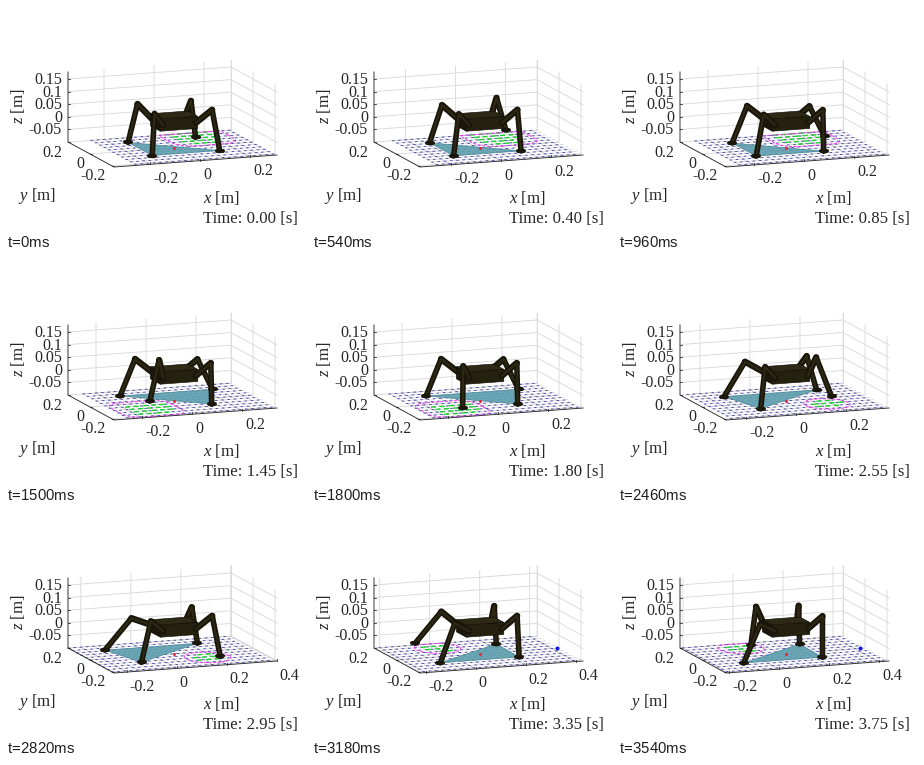
Recreate the animation shown at these times as a matplotlib script. Size 300 by 225 pixels, loop 3.6 s.

```python
import numpy as np
import matplotlib as mpl
import matplotlib.pyplot as plt
from matplotlib.animation import FuncAnimation
from matplotlib.collections import LineCollection
from matplotlib.patches import Polygon

W, H, DPI = 300, 225, 100
FRAMES, STEP = 60, 60
PX = 72 / DPI

mpl.rcParams.update({
    "font.family": "Liberation Serif",
    "mathtext.fontset": "custom",
    "mathtext.rm": "Liberation Serif",
    "mathtext.it": "Liberation Serif:italic",
})

# Axes box on screen: front corner, floor edges, wall height
FRONT = np.array([108.0, 161.0])
EX = np.array([163.0, -12.0])
EY = np.array([-46.0, -25.0])
WALL = 70
X_SCALE, Z_SCALE, Y_SPAN = 250, 252, 0.42   # px/m, px/m, m
Y_ZERO = 0.52                               # place of y = 0 along its edge
TERRAIN_START = -0.25

INK = "#262626"
GRID = "#dadada"
DARK = "#1a170a"
OLIVE = "#2d2914"
TEAL = "#5f9fae"
BLUE = "#4646a4"
MAGENTA = "#ee3cee"
GREEN = "#1fd42f"

# Robot in metres
HEIGHT, THIGH, SHIN, LIFT = 0.106, 0.081, 0.163, 0.03
HALF = np.array([0.075, 0.045, 0.024])
LEGS = [(sx, sy) for sy in (1, -1) for sx in (-1, 1)]   # far pair, then near pair
# One swing per second: leg, step length, centre x, radius and roundness of its area
SWINGS = [(1, 0.10, 0.14, 0.125, 4), (2, 0.05, -0.125, 0.12, 4),
          (3, 0.095, 0.18, 0.085, 2), (0, 0.18, 0.0, 0.085, 2)]


def ramp(t, start, end):
    return min(max((t - start) / (end - start), 0.0), 1.0)


def ease(u):
    return u * u * (3 - 2 * u)


def clock(k):
    """Time shown: steps of 0.05 s, later with every third one doubled."""
    return 0.05 * (max(k - 1, 0) + max(0, (k - 8) // 3))


def travel(t):
    return 0.032 * ramp(t, 0, 0.7) + 0.1 * ramp(t, 2.1, 3.5)


def edge(a, b, up=0):
    """Screen point at fractions a, b of the floor edges."""
    a, b = np.asarray(a)[..., None], np.asarray(b)[..., None]
    return FRONT + a * EX + b * EY - np.array([0, up])


class View:
    """Maps metres to the screen while the box follows the robot."""

    def __init__(self, shift):
        self.x0 = 194 - X_SCALE * shift

    def a(self, x):
        return (self.x0 + x * X_SCALE - FRONT[0]) / EX[0]

    def b(self, y):
        return Y_ZERO + y / Y_SPAN

    def at(self, x, y, z=0):
        return edge(self.a(x), self.b(y), z * Z_SCALE)

    def mesh(self, dx, dy):
        x, y = np.meshgrid(np.arange(TERRAIN_START, 0.6, dx), np.arange(-0.2, 0.21, dy))
        x, y = x.ravel(), y.ravel()
        a, b = self.a(x), self.b(y)
        ok = (a > 0) & (a < 0.99) & (b > 0) & (b < 1)
        return x[ok], y[ok]


fig = plt.figure(figsize=(W / DPI, H / DPI), dpi=DPI, facecolor="white")
ax = fig.add_axes([0, 0, 1, 1])


def line(points, color, width, z=1, **kw):
    p = np.asarray(points)
    ax.plot(p[:, 0], p[:, 1], color=color, lw=width * PX, zorder=z, **kw)


def fill(points, color, z, **kw):
    ax.add_patch(Polygon(points, closed=True, fc=color, zorder=z, **kw))


def dot(p, size, color):
    ax.plot(p[0], p[1], marker="o", ms=size * PX, color=color, mew=0, zorder=3)


def label(x, y, s, size=16, **kw):
    ax.text(x, y, s, fontsize=size * PX, color=INK, zorder=20, **kw)


def dashes(points, color, length, width, z):
    half = EX / np.hypot(*EX) * length / 2
    segs = np.stack([points - half, points + half], axis=1)
    ax.add_collection(LineCollection(segs, colors=color, linewidths=width * PX, zorder=z))


def draw_axes(v):
    for x in (-0.2, 0, 0.2, 0.4):
        a = v.a(x)
        if 0 <= a <= 1:
            line([edge(a, 0), edge(a, 1), edge(a, 1, WALL)], GRID, 0.9)
            p = edge(a, 0)
            line([p, p - [0, 2]], INK, 0.8, 4)
            label(p[0] + 3, p[1] + 18.5, f"{x:g}")
    for y in (-0.2, 0, 0.2):
        b = v.b(y)
        line([edge(0, b), edge(1, b), edge(1, b, WALL)], GRID, 0.9)
        p = edge(0, b)
        line([p, p + [2, 0]], INK, 0.8, 4)
        label(p[0] - 6, p[1] + 14.5, f"{y:g}", ha="right")
    for z in np.arange(-0.05, 0.16, 0.05):
        up = (z + 0.1) * Z_SCALE
        line([edge(0, 1, up), edge(1, 1, up), edge(1, 0, up)], GRID, 0.9)
        p = edge(0, 1, up)
        line([p, p + [2, 0]], INK, 0.8, 4)
        label(56, p[1] + 5, f"{round(z, 2) + 0:g}", ha="right")
    line([edge(1, 1), edge(1, 1, WALL)], GRID, 0.9)
    line([edge(0, 1, WALL), edge(0, 1), edge(0, 0), edge(1, 0)], INK, 0.9, 4)


def draw_terrain(v):
    left = max(0, v.a(TERRAIN_START))
    for y in np.arange(-0.2, 0.21, 0.04):
        line([edge(left, v.b(y)), edge(1, v.b(y))], "#bcbcca", 0.5, 2.1)
    for x in np.arange(TERRAIN_START, 0.6, 0.05):
        a = v.a(x)
        if 0 < a < 1:
            line([edge(a, 0), edge(a, 1)], "#c8c8d2", 0.5, 2.1)
    dashes(v.at(*v.mesh(0.025, 0.04)), BLUE, 2.5, 0.9, 2.2)


def draw_area(v, cx, cy, r, n):
    """Green footholds inside a dashed outline."""
    x, y = v.mesh(0.035, 0.04)
    core = (abs(x - cx) ** n + abs(y - cy) ** n) ** (1 / n) < 0.75 * r
    dashes(v.at(x[core], y[core]), GREEN, 5, 1.4, 2.7)

    q = np.linspace(0, 2 * np.pi, 49)
    c, s = np.cos(q), np.sin(q)
    x = cx + r * np.sign(c) * abs(c) ** (2 / n)
    y = cy + r * np.sign(s) * abs(s) ** (2 / n)
    rim = edge(np.clip(v.a(x), 0, 1), np.clip(v.b(y), 0, 1))
    line(rim, MAGENTA, 1, 2.8, ls=(0, (3, 1.5)))


def home(leg):
    sx, sy = LEGS[leg]
    return np.array([0.135 * sx, 0.02 + 0.11 * sy, 0])


def foot(leg, t):
    order = [s[0] for s in SWINGS].index(leg)
    u = ramp(t, order + 0.12, order + 0.82)
    return home(leg) + [SWINGS[order][1] * ease(u), 0, LIFT * np.sin(np.pi * u)]


def bend(hip, end):
    """Knee of a two-part leg that bends upwards."""
    d = end - hip
    flat, reach = np.hypot(d[0], d[1]), np.linalg.norm(d)
    c = (THIGH ** 2 + reach ** 2 - SHIN ** 2) / (2 * THIGH * reach)
    up = np.arccos(np.clip(c, -1, 1)) + np.arctan2(d[2], flat)
    side = d[:2] / flat * THIGH * np.cos(up)
    return hip + [side[0], side[1], THIGH * np.sin(up)]


def draw_leg(v, leg, body, end):
    sx, sy = LEGS[leg]
    hip = body + [0.065 * sx, 0.05 * sy, 0]
    h, k, f = (v.at(*p) for p in (hip, bend(hip, end), end))
    z = 5 if sy > 0 else 9
    kw = dict(solid_capstyle="round", solid_joinstyle="round")
    line([h, k], DARK, 6.4, z, **kw)
    line([k, f], DARK, 5.6, z, **kw)
    line([h, k, f], OLIVE, 2, z + 0.1, **kw)
    line([f - [3, 0], f + [3, 0]], DARK, 4, z + 0.2, **kw)


def draw_body(v, body):
    def face(axis, sign, color):
        i, j = [n for n in range(3) if n != axis]
        pts = []
        for p, q in ((-1, -1), (1, -1), (1, 1), (-1, 1)):
            c = np.zeros(3)
            c[axis], c[i], c[j] = sign, p, q
            pts.append(v.at(*(body + c * HALF)))
        fill(pts, color, 7, ec="#0e0c05", lw=0.6 * PX, joinstyle="round")

    face(2, 1, OLIVE)
    face(0, -1, DARK)
    face(1, -1, "#25210f")


def draw(k):
    ax.clear()
    ax.set(xlim=(0, W), ylim=(H, 0))
    ax.axis("off")
    t = clock(k)
    v = View(travel(t))
    body = np.array([travel(t) - 0.008, 0, HEIGHT])
    feet = [foot(i, t) for i in range(4)]
    swing, _, cx, r, n = SWINGS[min(int(t + 1e-6), 3)]

    draw_axes(v)
    draw_terrain(v)
    support = [v.at(*feet[i]) for i in range(4) if i != swing]
    fill(support, TEAL, 2.4, ec="#3f7f90", lw=0.6 * PX, alpha=0.92)
    draw_area(v, cx, home(swing)[1], r, n)
    dot(v.at(body[0], 0), 3, "#e0283c")
    if v.a(0.42) <= 1:
        dot(v.at(0.42, 0), 4, "#1414e6")

    for i in range(4):
        draw_leg(v, i, body, feet[i])
    draw_body(v, body)

    label(197, 197, "$x$ [m]", 16.7)
    label(12, 194, "$y$ [m]", 16.7)
    label(12, 100, "$z$ [m]", 16.7, rotation=90, ha="center", va="center")
    label(197, 217, f"Time: {t:.2f} [s]", 16.7)
    return []


anim = FuncAnimation(fig, draw, frames=FRAMES, interval=STEP, repeat=True,
                     init_func=lambda: draw(0), cache_frame_data=False)
plt.show()
```
